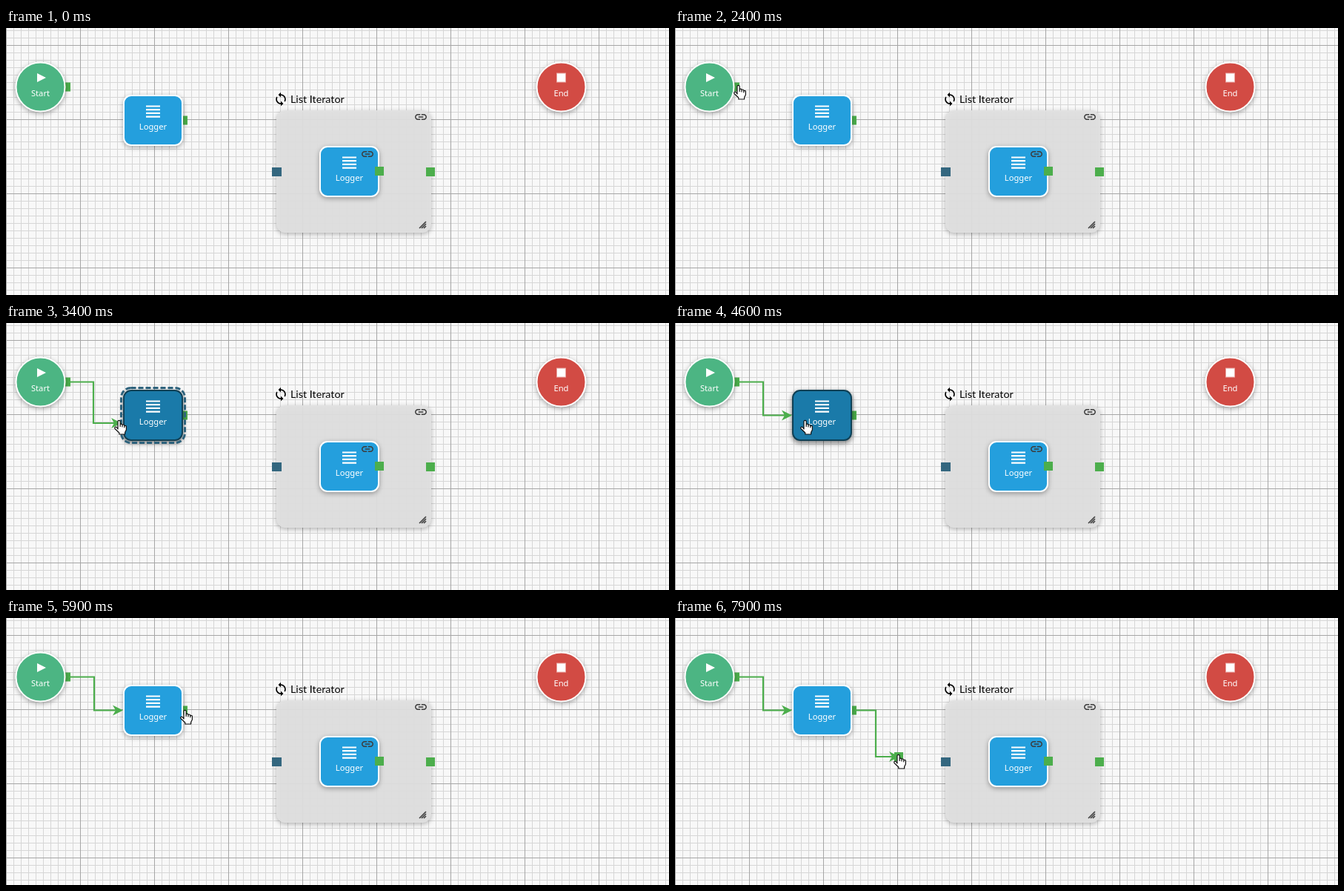
These frames come from a looping animation (895 by 360 pixels, 8 s). An HTML page:

```html
<!DOCTYPE html>
<html lang="en">
<head>
<meta charset="utf-8">
<title>Flow editor</title>
<style>
  html, body { margin: 0; width: 100%; height: 100%; overflow: hidden; }
  svg { display: block; }
  .card, .disc { stroke-width: 2; filter: drop-shadow(0 2px 3px rgba(0, 0, 0, .33)); }
  .card { fill: var(--fill, #249fdd); stroke: var(--edge, #fff); }
  .disc { stroke: #fff; }
  .hover { --fill: #1a7aa9; --edge: #0f4055; filter: drop-shadow(0 3px 3px rgba(0, 0, 0, .25)); }
  .label { font: 11.2px "Noto Sans", sans-serif; fill: #fff; text-anchor: middle; }
  .title { font: 14.3px Lato, sans-serif; }
  .port { fill: #4cae4c; }
  .wire { fill: none; stroke: #4cae4c; stroke-width: 2.2; }
  .snap { fill: none; stroke: #2d627c; stroke-width: 3; stroke-dasharray: 7 3; }
</style>
</head>
<body>
<svg width="895" height="360" viewBox="0 0 895 360">
  <defs>
    <pattern id="minor" width="10" height="10" y="3" patternUnits="userSpaceOnUse">
      <path d="M.5 0V10M0 .5H10" stroke="#d6d6d6"/>
    </pattern>
    <pattern id="major" width="100" height="100" y="23" patternUnits="userSpaceOnUse">
      <path d="M.5 0V100M0 .5H100" stroke="#a6a6a6"/>
    </pattern>
    <g id="logger">
      <rect class="card" x="1" y="1" width="79" height="67" rx="10"/>
      <path d="M31 15.5h19m-19 4.7h19m-19 4.7h19m-19 4.7h19" stroke="#fff" stroke-width="2.2"/>
      <text class="label" x="40.5" y="47">Logger</text>
    </g>
    <path id="chain" fill="#3c3c3c" transform="scale(.8) translate(-12 -12)" d="M3.9 12c0-1.71 1.39-3.1 3.1-3.1h4V7H7c-2.76 0-5 2.24-5 5s2.24 5 5 5h4v-1.9H7c-1.71 0-3.1-1.39-3.1-3.1zM8 13h8v-2H8v2zm9-6h-4v1.9h4c1.71 0 3.1 1.39 3.1 3.1s-1.39 3.1-3.1 3.1h-4V17h4c2.76 0 5-2.24 5-5s-2.24-5-5-5z"/>
    <rect id="port" class="port" x="-6" y="-6" width="12" height="12"/>
    <path id="head" class="port" d="M0 0L-14-7L-10 0L-14 7Z"/>
  </defs>

  <rect width="895" height="360" fill="#f8f8f8"/>
  <rect width="895" height="360" fill="url(#minor)"/>
  <rect width="895" height="360" fill="url(#major)"/>

  <!-- iterator -->
  <rect x="365" y="111" width="209" height="165" rx="12" fill="#e1e1e1" fill-opacity=".93" style="filter:drop-shadow(0 2px 3px rgba(0,0,0,.3))"/>
  <path transform="translate(371 96) scale(.85) translate(-12 -12)" d="M12 4V1L8 5l4 4V6c3.31 0 6 2.69 6 6 0 1.01-.25 1.97-.7 2.8l1.46 1.46C19.54 15.03 20 13.57 20 12c0-4.42-3.58-8-8-8zm0 14c-3.31 0-6-2.69-6-6 0-1.01.25-1.97.7-2.8L5.24 7.74C4.46 8.97 4 10.43 4 12c0 4.42 3.58 8 8 8v3l4-4-4-4v3z"/>
  <text class="title" x="384" y="101">List Iterator</text>
  <use href="#chain" x="560" y="120"/>
  <path d="M558 270l9-9M561 270l6-6M564 270l3-3" stroke="#444" stroke-width="1.7"/>
  <rect x="359" y="188" width="13" height="12" fill="#34677f"/>
  <use href="#port" x="573" y="194"/>
  <use href="#logger" x="423" y="159"/>
  <use href="#chain" x="488" y="170"/>
  <use href="#port" x="504" y="193"/>

  <!-- start and end -->
  <use href="#port" x="81" y="79.5"/>
  <circle class="disc" cx="46.5" cy="79.5" r="33" fill="#4cb583"/>
  <path d="M42 61l12 6l-12 6z" fill="#fff"/>
  <text class="label" x="46.5" y="92">Start</text>
  <circle class="disc" cx="749.5" cy="79.5" r="33" fill="#d24b44"/>
  <rect x="743.5" y="61" width="12" height="12" fill="#fff" stroke="#e9a5a1"/>
  <text class="label" x="749.5" y="92">End</text>

  <use href="#port" x="239" y="124.5"/>
  <use id="target" href="#logger" x="158" y="90"/>
  <rect id="snap" class="snap" x="155.5" y="87.5" width="86" height="74" rx="13"/>

  <g id="link1"><path class="wire"/><use href="#head"/><use href="#port"/></g>
  <g id="link2"><path class="wire"/><use href="#head"/><use href="#port"/></g>

  <path id="hand" fill="#fff" stroke="#111" stroke-width="1.2" stroke-linejoin="round" d="M5 12V2a1.6 1.6 0 0 1 3.2 0V8.5V6.6a1.4 1.4 0 0 1 2.8 0V9V7.4a1.4 1.4 0 0 1 2.8 0V9.8V8.6a1.3 1.3 0 0 1 2.6 0V13L14.6 16.6V19H6.8V17L1 11.5a1.5 1.5 0 0 1 2.2-2z"/>
</svg>
<script>
const LOOP = 8000, STEP = 100;
const ENTER = 600, DRAG = 2900, SNAP = 3400, DROP = 4600, LEAVE = 5700, DRAG2 = 7200;
const $ = id => document.getElementById(id);
const show = (el, on) => el.style.display = on ? '' : 'none';
const place = (el, x, y) => el.setAttribute('transform', `translate(${x} ${y})`);

// Hand waypoints: time, x, y
const route = [
  [ENTER, 134, 25], [900, 90, 65], [1200, 79, 77],
  [DRAG - STEP, 79, 77], [SNAP, 146, 131], [3600, 176, 132], [3800, 169, 131],
  [5000, 169, 131], [5500, 233, 122], [5900, 235, 124],
  [DRAG2 - STEP, 235, 124], [7500, 251, 130], [7900, 295, 184]
];

function handAt(t) {
  const i = Math.max(1, route.findIndex(p => p[0] >= t));
  const [t0, x0, y0] = route[i - 1], [t1, x1, y1] = route[i];
  const u = (t - t0) / (t1 - t0);
  return [Math.round(x0 + (x1 - x0) * u), Math.round(y0 + (y1 - y0) * u)];
}

// Elbow connector with an arrow head; a loose end carries a port.
function drawLink(id, x0, y0, [x, y], loose) {
  const mid = (x0 + x) / 2;
  const [wire, head, port] = $(id).children;
  wire.setAttribute('d', `M${x0 + 4} ${y0}H${mid}V${y}H${Math.max(mid, x - 9)}`);
  place(head, x, y);
  place(port, x - 1, y);
  show(port, loose);
}

function draw(t) {
  const [x, y] = handAt(t), grip = [x + 8, y + 3];
  show($('hand'), t >= ENTER);
  place($('hand'), x, y);

  $('target').classList.toggle('hover', t >= SNAP && t < LEAVE);
  show($('snap'), t >= SNAP && t < DROP);

  show($('link1'), t >= DRAG);
  drawLink('link1', 80, 79.5, t < SNAP ? grip : t < DROP ? [156, 135] : [158, 124.5], t < SNAP);
  show($('link2'), t >= DRAG2);
  drawLink('link2', 239, 124.5, grip, true);
}

function frame() {
  const t = performance.now() % LOOP;
  draw(t - t % STEP);
  requestAnimationFrame(frame);
}
frame();
</script>
</body>
</html>
```
